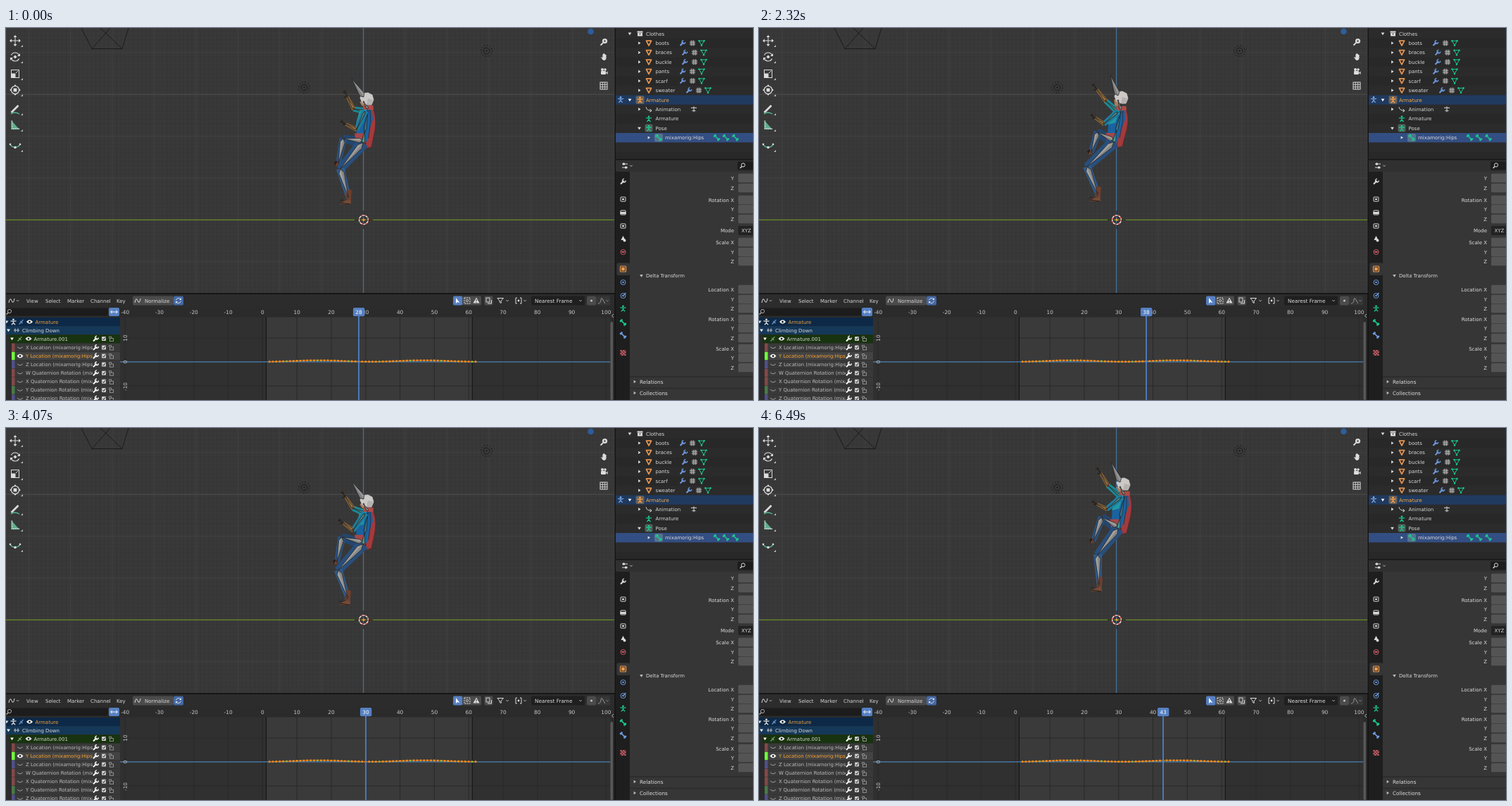
An HTML page that plays this animation: 1061x528 px, repeating every 6.59 s.

```html
<!DOCTYPE html>
<html lang="en">
<head>
<meta charset="utf-8">
<title>Climbing Down</title>
<style>
html,body{margin:0;width:100%;height:100%;overflow:hidden;background:#393939}
svg{display:block;width:100vw;height:100vh;font-family:"DejaVu Sans",sans-serif}
text{white-space:pre}
</style>
</head>
<body>
<svg id="stage" viewBox="0 0 1061 528"></svg>
<script>
const rect = (x, y, w, h, fill, r = 0, more = '') =>
  `<rect x="${x}" y="${y}" width="${w}" height="${h}" fill="${fill}" rx="${r}" ${more}/>`;
const line = (d, color, w = 1, more = '') =>
  `<path d="${d}" fill="none" stroke="${color}" stroke-width="${w}" ${more}/>`;
const shape = (d, fill, more = '') => `<path d="${d}" fill="${fill}" ${more}/>`;
const disc = (x, y, r, fill, more = '') => `<circle cx="${x}" cy="${y}" r="${r}" fill="${fill}" ${more}/>`;
const text = (x, y, s, fill = '#d8d8d8', size = 7, anchor = 'start') =>
  `<text x="${x}" y="${y + size * .36}" font-size="${size}" fill="${fill}" text-anchor="${anchor}">${s}</text>`;
const at = (x, y, body) => `<g transform="translate(${x} ${y})">${body}</g>`;
const each = (list, fn) => list.map(fn).join('');
const range = (n, fn) => each([...Array(n).keys()], fn);

const WHITE = '#dcdcdc', GREEN = '#1bc98e', ORANGE = '#f0a03c', BLUE = '#5680c2';
const frameX = f => 364.4 + 4.88 * f;

// Icons, drawn around 0,0
const open = c => shape('M-2.4,-1.4H2.4L0,2.2Z', c);
const closed = c => shape('M-1.4,-2.2V2.2L2,0Z', c);
const chevron = c => line('M-1.7,-.8L0,.9L1.7,-.8', c, .8);
const wrench = c => line('M-3.5,3.5L1.2,-1.2', c, 2) + line('M1.4,-3.8A2.4,2.4 0 1 0 3.8,-1.4', c, 1.3);
const mesh = c => line('M-3.6,-3.2H3.6L0,3.2Z', c, 1) + disc(-3.6, -3.2, 1.2, c) + disc(3.6, -3.2, 1.2, c) + disc(0, 3.4, 1.2, c);
const bone = c => line('M-2.6,-2.6L2.6,2.6', c, 1.6) + each([[-3.4, -2], [-2, -3.4], [3.4, 2], [2, 3.4]], p => disc(...p, 1.4, c));
const group = c => rect(-3.5, -3.5, 7, 7, '#666', 1) + line('M-4,-1.2H4M-4,1.5H4M-1.2,-4V4M1.5,-4V4', c, .7);
const man = c => disc(0, -3, 1.4, c) + line('M-4,-1.2L0,-.6L4,-1.2M0,-1V1.4L-2.6,4.2M0,1.4L2.6,4.2', c, 1.3);
const lens = c => disc(1, -1, 2.6, 'none', `stroke="${c}"`) + line('M-.9,.9L-3.4,3.4', c, 1.4);
const eye = c => shape('M-4.5,0Q0,-5.5 4.5,0Q0,5.5 -4.5,0Z', c) + disc(0, 0, 1.5, '#222');
const lash = c => line('M-4,-1Q0,3.4 4,-1', c, .9);
const pin = c => line('M-3.5,3.5L-.5,.5M-1.8,-1.2L1.4,2M0,-.2L2.4,-2.8', c, 1.2);
const wave = c => line('M-4,3Q-2.5,-6 0,0T4,-3', c, 1);
const orbit = c => disc(0, 0, 3.5, 'none', `stroke="${c}"`) + disc(0, 0, 1.3, c);
const box = c => rect(-3.5, -3, 7, 6, 'none', .5, `stroke="${c}"`) + rect(-1.5, -1, 3, 2, c);

function viewport() {
  let minor = '', major = '';
  for (let i = -86; i <= 60; i++) {
    const x = (507.6 + i * 5.94).toFixed(1);
    if (i % 10) minor += `M${x},0V376`; else major += `M${x},0V376`;
  }
  for (let i = -45; i <= 17; i++) {
    const y = (272.4 + i * 5.94).toFixed(1);
    if (i % 10) minor += `M0,${y}H864`; else major += `M0,${y}H864`;
  }
  const light = (x, y) => at(x, y,
    disc(0, 0, 4.4, 'none', 'stroke="#111" stroke-width=".8"') + disc(0, 0, 1, '#111') +
    disc(0, 0, 7.8, 'none', 'stroke="#161616" stroke-width=".9" stroke-dasharray="2 2.1"'));
  const tools = [
    line('M-6,0H6M0,-6V6', WHITE, 1) + shape('M-8,0l3,-2.5v5zM8,0l-3,-2.5v5zM0,-8l-2.5,3h5zM0,8l-2.5,-3h5z', WHITE),
    line('M-5.5,-2.5A6,6 0 0 1 5.6,-2M5.5,2.5A6,6 0 0 1 -5.6,2', WHITE, 1.2) + shape('M0,-2.6L2.6,0L0,2.6L-2.6,0ZM7,-5v4h-4zM-7,5v-4h4z', WHITE),
    rect(-5.5, -5.5, 11, 11, 'none', 0, 'stroke="#dcdcdc"') + rect(-5.5, -.5, 6, 6, WHITE) + line('M1,-1L4,-4', WHITE),
    disc(0, 0, 5.6, 'none', 'stroke="#dcdcdc" stroke-width="1.3"') + rect(-2.4, -2.4, 4.8, 4.8, WHITE) + shape('M-8,0l3,-2v4zM8,0l-3,-2v4zM0,-8l-2,3h4zM0,8l-2,-3h4z', WHITE),
    line('M-5.5,5L4.5,-5', WHITE, 2.6) + line('M-6,7Q-1,3 6,7', '#55b58d', 1.4),
    shape('M-5.5,-7V6H6Z', '#5fae8b') + line('M-4.5,-6.5V5H6', WHITE, 1.3, 'stroke-dasharray="1.6 1"'),
    line('M-7,-1Q0,6 7,-1', '#5cc09d', 1.2) + disc(-7, -2, 1.3, WHITE) + disc(7, -2, 1.3, WHITE) + disc(0, 2.5, 1.8, WHITE)
  ];
  const toolY = [18, 41, 65, 88, 115, 138, 167];
  const hand = shape('M-4,0L-1.6,1V-3.8h1.2V-5h1.3v1h1.3v1h1.3V2Q3,5 0,5Q-2,4.5 -4,0Z', WHITE);
  const film = disc(-2, -3, 2, WHITE) + disc(2, -3, 1.8, WHITE) + rect(-4, -1, 7, 5, WHITE, 1) + shape('M3,1.4L5.5,-.5V4Z', WHITE);
  return rect(0, 0, 864, 376, '#393939') + line(minor, '#353535', .6) + line(major, '#434343', .8) +
    line('M0,94.3H864', '#4b4b4b') +
    line('M507.6,0V376', '#46749e', 1.2) + line('M0,272.4H864', '#698b25', 1.2) +
    line('M107,0L122,29.5H165L174,0M122,29.5L148,0M165,29.5L134,0', '#151515', .8) +
    light(423.5, 84.5) + light(682.5, 32.5) + disc(830.5, 5, 4.3, '#2f5d9b') +
    each(tools, (b, i) => at(13, toolY[i], b) + shape(`M24,${toolY[i] + 6}v3h-3z`, '#bbb')) +
    at(849, 20, line('M-4.5,4.5L-1,1', WHITE, 1.8) + disc(1.5, -1.5, 3.6, WHITE) + line('M-.3,-1.5H3.3M1.5,-3.3V.3', '#444', .8)) +
    at(849, 41, hand) + at(849, 62, film) +
    at(849, 82, rect(-5, -5, 10, 10, 'none', 0, 'stroke="#dcdcdc"') + line('M-5,-1.7H5M-5,1.7H5M-1.7,-5V5M1.7,-5V5', WHITE, .9));
}

function cursor() {
  return at(508, 272.3,
    line('M-13,0H-4M4,0H13M0,-13V-4M0,4V13', '#151515', .9) +
    disc(0, 0, 6.4, 'none', 'stroke="#fff" stroke-width="1.3"') +
    disc(0, 0, 6.4, 'none', 'stroke="#d43b32" stroke-width="1.3" stroke-dasharray="2.51"') +
    disc(0, 0, 1.7, '#f09a3c'));
}

function header() {
  const menus = [[29, 'View'], [56, 'Select'], [87, 'Marker'], [120, 'Channel'], [157, 'Key']];
  const gray = '#4b4b4b';
  return rect(0, 378, 864, 18, '#2c2c2c') +
    at(8, 387, wave(WHITE)) + at(16.5, 387, chevron(WHITE)) + each(menus, ([x, s]) => text(x, 387, s)) +
    rect(180, 380.5, 58, 13, gray, 2) + at(187, 387, wave(WHITE)) + text(197, 387, 'Normalize') +
    rect(238, 380.5, 14, 13, '#4468a6', 2) +
    at(245, 387, line('M-3.5,-.5A3.6,3.6 0 0 1 3,-2M3.5,.5A3.6,3.6 0 0 1 -3,2', '#e4e4e4', .9) + shape('M4,-4v3h-3zM-4,4v-3h3z', '#e4e4e4')) +
    rect(635, 380.5, 13.5, 13, BLUE, 2) + shape('M639,383v8l2,-2l3.5,1z', '#fff') +
    rect(648.5, 380.5, 26.5, 13, gray, 2) +
    at(655, 387, rect(-4, -4, 8, 8, 'none', 0, 'stroke="#ddd" stroke-dasharray="2 1"') + disc(0, 0, 1.6, 'none', 'stroke="#ddd" stroke-width=".8"')) +
    shape('M668,382.5l4.5,8h-9z', WHITE) + line('M668,385v3M668,389v1', '#333') +
    rect(679.5, 380.5, 12, 13, gray, 2) + rect(682, 383, 5, 6, 'none', 0, 'stroke="#ddd" stroke-width=".9"') + line('M684,391h5.5v-5', WHITE) +
    line('M698,383.5h8.5l-3.3,3.8v3.2l-2,-1.2v-2z', WHITE) + at(712, 387, chevron(WHITE)) +
    at(728, 387, line('M-2,-4H-4V4H-2M2,-4H4V4H2', WHITE) + disc(0, 0, 1.4, WHITE)) + at(737, 387, chevron(WHITE)) +
    rect(746, 380.5, 76, 13, '#1f1f1f', 2) + text(751, 387, 'Nearest Frame', WHITE, 7.3) + at(816, 387, chevron(WHITE)) +
    rect(825, 380.5, 13, 13, gray, 2) + disc(831.5, 387, 1.6, '#bbb') + rect(838, 380.5, 20, 13, '#363636', 2) +
    line('M841,391Q844.5,391 845,386T848,386T851,391', '#999') + at(854, 387, chevron('#999'));
}

function channels() {
  const names = ['X Location (mixamorig:Hips)', 'Y Location (mixamorig:Hips)', 'Z Location (mixamorig:Hips)', 'W Quaternion Rotation (mixamorig',
    'X Quaternion Rotation (mixamorig', 'Y Quaternion Rotation (mixamorig', 'Z Quaternion Rotation (mixamorig'];
  const strips = ['#844848', '#70ff3d', '#50508a', '#844848', '#844848', '#487a48', '#50508a'];
  const marks = y => at(127.5, y, wrench('#fff')) +
    at(139, y, rect(-3, -3, 6, 6, '#ccc', 1) + line('M-1.8,0L-.4,1.6L2.2,-1.8', '#222', 1)) +
    at(150, y, rect(-2.5, -.5, 5, 4, 'none', 0, 'stroke="#999" stroke-width=".9"') + line('M-3.6,-.5V-3H-.4V-.5', '#999', .9));
  return rect(0, 396, 162, 132, '#2b2b2b') +
    rect(0, 397.5, 145, 11, '#1c1c1c', 2) + at(4, 403, lens('#aaa')) +
    rect(146, 397, 15, 12, BLUE, 2) + line('M148.5,403h10M151,400.8l-2.5,2.2l2.5,2.2M156,400.8l2.5,2.2l-2.5,2.2', '#fff', .9) +
    rect(0, 411, 162, 12, '#0d2947') + at(1, 417, open(WHITE)) + at(10.5, 417, man(WHITE)) + at(22, 417, pin('#6f9fd0')) + at(33.5, 417, eye('#fff')) + text(41.5, 417, 'Armature', ORANGE) +
    rect(0, 423.2, 162, 12, '#163858') + at(3.5, 429, open('#fff')) + at(15, 429, line('M-4,0H4M-2,-2.5V2.5M2,-2.5V2.5', '#bbb', 1.2)) + text(23, 429, 'Climbing Down') +
    rect(5, 435.4, 157, 12, '#18330f') + at(8.5, 441, open('#fff')) + at(20, 441, pin('#7da06d')) + at(32, 441, eye('#fff')) + text(39.5, 441, 'Armature.001') + marks(441) +
    '<clipPath id="names"><path d="M0,440H123V528H0Z"/></clipPath>' +
    each(names, (s, i) => {
      const y = 453.4 + i * 12.1, on = i === 1;
      return rect(8, y - 5.8, 154, 11.6, on ? '#434343' : '#393939') + rect(8, y - 5.8, 4.5, 11.6, strips[i]) +
        at(20, y, on ? eye('#fff') : lash('#aaa')) +
        `<g clip-path="url(#names)">${text(28, y, s, on ? '#ffa52e' : '#bdbdbd', 6.9)}</g>` + marks(y);
    });
}

function graph() {
  const curve = f => 473.6 - 1.9 * Math.pow(Math.sin(Math.PI * (f - 1) / 30.5), 2);
  let keys = '', path = '';
  for (let f = 2; f <= 62; f++) {
    const x = frameX(f).toFixed(1), y = curve(f).toFixed(1);
    path += (path ? 'L' : 'M') + x + ',' + y;
    keys += rect(x - 1.3, y - 1.3, 2.6, 2.6, f % 9 === 7 ? '#9bb53a' : '#ff8f1a', .6);
  }
  const turned = (y, s) => `<text transform="translate(171.5 ${y}) rotate(-90)" font-size="7.3" fill="#c8c8c8" text-anchor="middle">${s}</text>`;
  return rect(162, 396, 702, 132, '#2b2b2b') + rect(162, 410.5, 697, 118, '#303030') +
    rect(369.3, 410.5, 293, 118, '#3a3a3a') +
    line(range(15, i => `M${frameX(i * 10 - 40).toFixed(1)},410V528`), '#292929') +
    line('M162,440H859M162,508H859', '#292929') +
    line('M369.5,410V528M662.3,410V528', '#121212') +
    range(15, i => text(frameX(i * 10 - 40), 403.3, i * 10 - 40, '#c8c8c8', 7.4, 'middle')) +
    line('M162,473.9H859', '#4a82b8', 1.4) +
    turned(440, '10') + turned(474, '0') + turned(509, '-10') +
    line(path, '#d77a16', 1) + keys +
    rect(858.5, 410, 5.5, 118, '#2b2b2b') + rect(858.5, 417, 3.5, 111, '#595959', 1.7) + line('M863,406l-2.5,2.5l2.5,2.5', '#bbb');
}

function outliner() {
  const rowY = i => 8 + 13.42 * i;
  const clothes = [['boots', 961], ['braces', 964], ['buckle', 964], ['pants', 961], ['scarf', 961], ['sweater', 970]];
  const tri = c => line('M-3.6,-3.2H3.6L0,3.6Z', c, 1.7, 'stroke-linejoin="round"');
  return rect(866, 0, 195, 186, '#282828') + range(7, i => rect(866, rowY(2 * i) - 6.7, 195, 13.4, '#2b2b2b')) +
    rect(866, 95.3, 195, 13.4, '#203a5f') + rect(866, 149, 195, 13.4, '#334e82') +
    at(886, 8, open(WHITE)) + at(900.5, 8, rect(-4, -3.5, 8, 2, WHITE) + rect(-3.5, -1, 7, 4.5, WHITE) + line('M-1.2,.6h2.4', '#333')) + text(909, 8, 'Clothes') +
    each(clothes, ([s, x], i) => {
      const y = rowY(i + 1);
      return at(899.5, y, closed(WHITE)) + at(913, y, tri('#e39452')) + text(922.5, y, s) +
        at(x, y, wrench('#6f9be0')) + at(x + 14, y, group('#bbb')) + at(x + 27, y, mesh(GREEN));
    }) +
    at(873, 101.5, man('#7aa7e0')) + at(886, 102, open('#fff')) + rect(894.5, 96.3, 12, 11.4, '#6b6257', 2) + at(900.5, 102, man('#ffa04c')) + text(909, 102, 'Armature', '#ffab3d') +
    at(899.5, 115.3, closed(WHITE)) + at(913, 115.3, line('M-4,-3Q-3,2 3.5,2M1.5,-.5L4,2L1.5,4', WHITE)) + text(922.5, 115.3, 'Animation') +
    at(977, 115.3, line('M-4,-2H4M0,-4V4M-2.5,2H2.5', '#bbb', 1.2)) +
    at(913, 128.8, man(GREEN)) + text(922.5, 128.8, 'Armature') +
    at(899.5, 142.2, open(WHITE)) + rect(907.5, 136.6, 11, 11, '#4f5f5a', 2) + at(913, 142.2, man(GREEN)) + text(922.5, 142.2, 'Pose') +
    at(913, 155.6, closed(WHITE)) + rect(921, 150, 12, 11.4, '#56748c', 2) + at(927, 155.6, bone(GREEN)) + text(936, 155.6, 'mixamorig:Hips') +
    each([1009.5, 1022.5, 1036], x => at(x, 155.6, bone(GREEN)));
}

function properties() {
  const labels = [[213, 'Y'], [227, 'Z'], [244, 'Rotation X'], [257, 'Y'], [271, 'Z'], [304, 'Scale X'], [318, 'Y'], [331, 'Z'],
    [371, 'Location X'], [385, 'Y'], [398, 'Z'], [413, 'Rotation X'], [426, 'Y'], [440, 'Z'], [455, 'Scale X'], [468, 'Y'], [482, 'Z']];
  const blue = '#6f9be0', red = '#d05f68';
  const tabs = [[218, wrench(WHITE)], [243, box(WHITE)], [262, box(WHITE) + rect(-4, -1, 8, 3, WHITE)], [281, box(WHITE)],
    [299, shape('M0,-4L3,2H-3Z', WHITE) + disc(2, 2.5, 2, WHITE)], [318, orbit(red) + line('M-3,-1Q0,2 3,-1', red)],
    [342, rect(-4, -4, 8, 8, 'none', 1, 'stroke="#f09a4a" stroke-width="1.2"') + rect(-2.3, -2.3, 4.6, 4.6, '#f09a4a')],
    [361, orbit(blue)], [380, orbit(blue) + line('M1,-1L4,-4', blue, 1.5)], [398, man(GREEN)], [418, bone(GREEN)], [436, bone(blue)],
    [461, rect(-4, -4, 8, 8, '#5a3238') + range(8, i => rect(-4 + (i % 2) * 4 + (i >> 1) % 2 * 2, -4 + (i >> 1) * 2, 2, 2, red))]];
  return rect(866, 187.5, 195, 341, '#303030') + rect(866, 204, 20, 324, '#1e1e1e') + rect(886, 204, 175, 324, '#363636') +
    at(879, 195.5, line('M-4,-2.5H4M-4,2.5H4', WHITE) + disc(-1.5, -2.5, 1.7, WHITE) + disc(1.5, 2.5, 1.7, WHITE)) + at(888, 195.5, chevron(WHITE)) +
    rect(1039, 189.5, 24, 12, '#1c1c1c', 2) + at(1046, 195.5, lens(WHITE)) +
    rect(867.5, 333.5, 18.5, 17.5, '#363636', 2) + each(tabs, ([y, b]) => at(876.5, y, b)) +
    each(labels, ([y, s]) => text(1034, y, s, WHITE, 7, 'end') + rect(1040, y - 6.3, 25, 12.6, '#545454', 1.5)) +
    text(1034, 287.5, 'Mode', WHITE, 7, 'end') + rect(1040, 281, 25, 13, '#222', 2) + text(1044.5, 287.5, 'XYZ') +
    at(902.5, 351.5, open('#bbb')) + text(909, 352, 'Delta Transform', WHITE, 6.9) +
    line('M886,495H1061M886,511.5H1061', '#2b2b2b', 1.5) +
    at(893, 502, closed('#bbb')) + text(900, 502, 'Relations', WHITE, 7.3) + at(893, 518, closed('#bbb')) + text(900, 518, 'Collections', WHITE, 7.3);
}

// Joints: tip, head, neck, hips, hand/elbow high, hand/elbow low, knee/ankle far, knee/ankle near
const poses = {
  28: [491,72, 511,101, 511,112, 503,162, 482,92, 494,115, 478,134, 498,144, 479,157, 472,192, 475,200, 486,239],
  30: [491,76, 511,104, 511,115, 503,164, 479,93, 493,114, 475,132, 493,145, 477,155, 470,190, 472,202, 485,240],
  38: [499,67, 513,99, 511,113, 500,161, 476,82, 493,104, 474,125, 490,136, 481,148, 472,176, 466,197, 481,235],
  43: [500,48, 516,80, 516,92, 506,142, 482,59, 496,82, 476,106, 494,115, 487,127, 475,160, 481,180, 483,221],
  56: [495,74, 515,106, 515,119, 504,166, 482,98, 494,118, 489,112, 500,131, 473,160, 479,195, 470,195, 485,235],
  59: [492,83, 512,113, 513,124, 502,177, 483,98, 494,118, 487,142, 499,143, 477,155, 477,190, 476,207, 486,247]
};
const lifted = (pose, dy) => pose.map((v, i) => i % 2 ? v + dy : v);
poses[8] = lifted(poses[38], 6);
poses[13] = lifted(poses[43], 8);
poses[16] = lifted(poses[43], 4);
poses[46] = lifted(poses[43], -4);
const keyed = Object.keys(poses).map(Number).sort((a, b) => a - b);

function poseAt(f) {
  const next = keyed.findIndex(k => k > f);
  const a = next > 0 ? keyed[next - 1] : keyed[keyed.length - 1];
  const b = next < 0 ? keyed[0] : keyed[next];
  const u = ((f - a + 61) % 61) / ((b - a + 61) % 61);
  return poses[a].map((v, i) => v + (poses[b][i] - v) * u);
}

const fmt = pts => 'M' + pts.map(p => p.map(v => v.toFixed(1)).join()).join('L') + 'Z';
const off = (p, x, y) => [p[0] + x, p[1] + y];
const mix = (a, b, u) => [a[0] + (b[0] - a[0]) * u, a[1] + (b[1] - a[1]) * u];
const INK = 'stroke="#1c1c1c" stroke-width=".7" stroke-linejoin="round"';

function normal(a, b, w) {
  const dx = b[0] - a[0], dy = b[1] - a[1], l = Math.hypot(dx, dy) || 1;
  return [-dy / l * w, dx / l * w];
}
function limb(a, b, wa, wb, fill) {
  const [x, y] = normal(a, b, 1);
  return shape(fmt([off(a, x * wa, y * wa), off(b, x * wb, y * wb), off(b, -x * wb, -y * wb), off(a, -x * wa, -y * wa)]), fill,
    `stroke="${fill}" stroke-width="1.4" stroke-linejoin="round"`);
}
function rig(a, b, w, fill = '#a0a09e') {
  const m = mix(a, b, .14), [x, y] = normal(a, b, w);
  const l = off(m, x, y), r = off(m, -x, -y);
  return shape(fmt([a, l, b, r]), fill, INK) + shape(fmt([a, m, b, r]), 'rgba(0,0,0,.16)') + disc(...b, 1, '#777', INK);
}

function climber(f) {
  const v = poseAt(f), p = [];
  for (let i = 0; i < v.length; i += 2) p.push([v[i], v[i + 1]]);
  const [tip, head, neck, hips, handA, elbowA, handB, elbowB, kneeA, ankleA, kneeB, ankleB] = p;
  const shoulder = off(neck, -1, 6), seat = off(hips, 4, 1), crown = off(head, -3, -3);
  const spine = (u, x, y = 0) => off(mix(neck, hips, u), x, y);

  const arm = (hand, elbow, sleeve) => {
    const wrist = mix(hand, elbow, .25);
    return limb(shoulder, elbow, 4, 3, sleeve) + limb(elbow, wrist, 2.4, 1.4, '#8a6339') +
      line(`M${wrist}L${hand}l-3.5,-1.5M${hand}l-1,-3.5M${wrist}l-5,.5`, '#2b2018', 1.5) +
      rig(shoulder, elbow, 1.7, '#588588') + rig(elbow, wrist, 1.6, '#a98048');
  };
  const boot = ankle => {
    const sole = off(ankle, 0, 8);
    return limb(off(ankle, 1, -9), sole, 3.2, 3, '#6e4030') + limb(off(sole, 3, 0), off(sole, -11, 1), 2.4, 1, '#754a39') +
      line(`M${off(sole, -12, 0)}l3,-4M${off(sole, -12, 1)}l15,2`, '#211814', .9) + rig(ankle, off(sole, -9, 0), 1.3, '#6d655f');
  };
  const foot = off(ankleA, -2, -3);
  const back = `M${off(neck, 8, -1)}Q${off(neck, 16, 10)} ${spine(.6, 18, 2)}L${off(hips, 16, 7)}L${off(hips, 8, 9)}L${spine(.5, 4)}Z`;
  const hair = [[-8, -2], [-5, -8], [3, -9], [9, -6], [11, 1], [8, 8], [2, 8], [-5, 5]];

  return arm(handA, elbowA, '#1a8a96') +
    limb(seat, kneeA, 7.5, 5, '#23466f') + limb(kneeA, ankleA, 4.8, 3, '#2b517f') +
    limb(ankleA, off(foot, -3, 4), 2.5, 1.8, '#6e4030') + line(`M${foot}l-4,3M${foot}l-3,6`, '#1b1512', 1.2) +
    shape(back, '#a33a3c', 'stroke="#5e2627" stroke-width=".8"') +
    shape(fmt([off(neck, -8, 6), off(neck, 8, 1), spine(.35, 13), spine(.7, 10), off(hips, 9, 0), off(hips, -3, -3), spine(.7, -8), spine(.4, -10)]), '#1a62a0') +
    shape(fmt([off(neck, -9, 6), off(neck, 1, 3), spine(.45, 0), spine(.5, -10)]), '#209aa6') +
    shape(fmt([spine(.75, -10), spine(.75, 3), off(hips, 7, 1), off(hips, -6, -1)]), '#a5474a') +
    line(`M${off(neck, 6, 3)}L${spine(.4, 10)}L${spine(.9, 11)}`, '#23354a', 1) +
    limb(off(neck, -3, 1), off(neck, 10, 1), 2, 2.6, '#b04a46') +
    limb(off(head, -4, 3), off(neck, -2, -3), 4, 3, '#a97c62') +
    shape(fmt(hair.map(([x, y]) => off(head, x, y))), '#cbc8c6', 'stroke="#cbc8c6" stroke-width="1" stroke-linejoin="round"') +
    shape(fmt([off(head, 3, -1), off(head, 11, 1), off(head, 8, 8), off(head, 1, 8)]), '#b5b1af') +
    limb(seat, kneeB, 8, 5.2, '#284f7d') + limb(kneeB, ankleB, 5.2, 3, '#2f5a8d') + boot(ankleB) +
    rig(off(seat, -1, -3), kneeA, 3.2) + rig(kneeA, ankleA, 3.4) +
    rig(seat, kneeB, 3.8) + rig(kneeB, ankleB, 3.8) +
    rig(seat, spine(.7, 4), 2.2, '#4aa69c') + rig(spine(.7, 4), off(shoulder, 4, 0), 2, '#3b7894') + rig(off(shoulder, 4, -3), off(head, -3, 4), 1.6, '#8c9292') +
    arm(handB, elbowB, '#1d7fa0') + rig(crown, tip, 3.8, '#969696');
}

function playhead(f) {
  const x = Math.round(frameX(f));
  return rect(x - .8, 408, 1.7, 120, '#5083cf') + rect(x - 8, 397, 16.4, 12.2, BLUE, 2) + text(x, 403.3, f, '#fff', 7.4, 'middle');
}

// Runs of evenly spaced redraws: first, last, count
const runs = [[0, 0, 1], [130, 1140, 8], [1280, 2320, 8], [2480, 3020, 5], [3170, 3470, 3],
  [3630, 4070, 4], [4230, 4640, 4], [4770, 5770, 8], [5910, 6490, 5]];
const ticks = runs.flatMap(([a, b, n]) => [...Array(n).keys()].map(i => Math.round((a + (b - a) * i / Math.max(1, n - 1)) / 10) * 10));
const pace = [[0, 28], [1000, 59], [2320, 99], [3020, 120], [4070, 152], [4910, 178], [6490, 226]];
const LOOP = 6590;

function frameAt(t) {
  const i = Math.min(pace.length - 2, pace.filter(k => k[0] <= t).length - 1);
  const [a, from] = pace[i], [b, to] = pace[i + 1];
  return (Math.round(from + (to - from) * (t - a) / (b - a)) - 1) % 61 + 1;
}

const stage = document.getElementById('stage');
stage.innerHTML = rect(0, 0, 1061, 528, '#161616') + viewport() + '<g id="climber"></g>' + cursor() + header() + graph() +
  '<g id="playhead"></g>' + channels() + outliner() + properties();
const body = document.getElementById('climber'), marker = document.getElementById('playhead');
const start = performance.now();
let shown = -1;

function draw(now) {
  const t = Math.max(0, now - start) % LOOP;
  const f = frameAt(ticks.filter(k => k <= t).pop());
  if (f !== shown) {
    body.innerHTML = climber(f);
    marker.innerHTML = playhead(f);
    shown = f;
  }
  requestAnimationFrame(draw);
}
draw(start);
</script>
</body>
</html>
```
